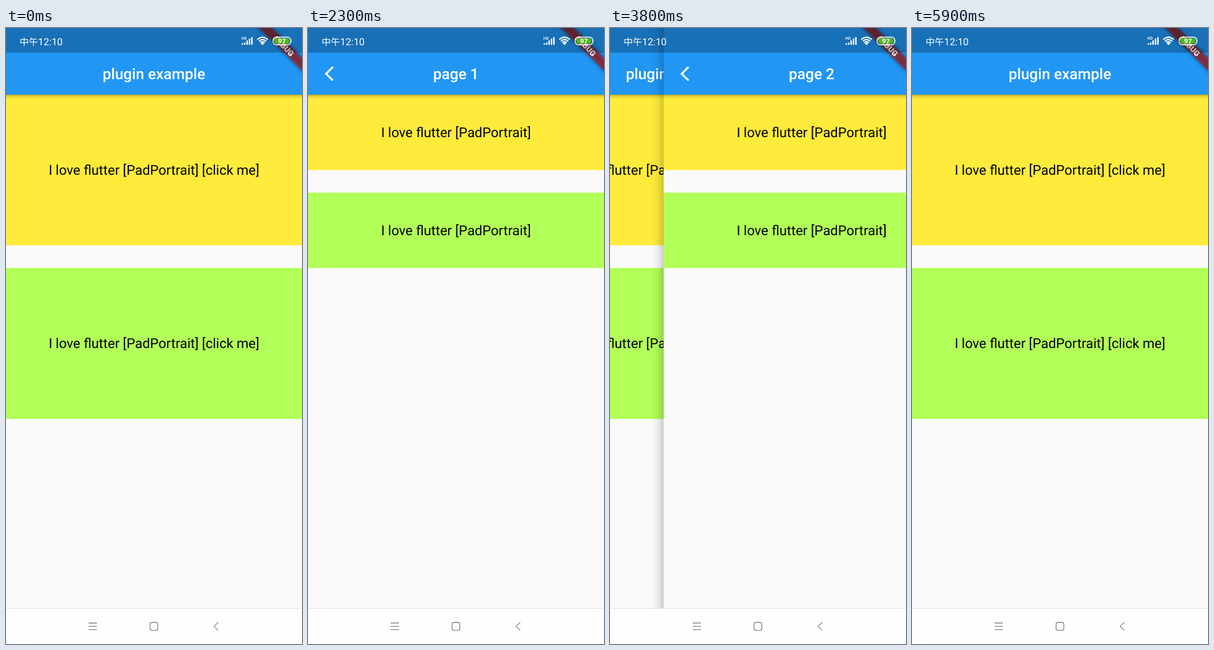
Write an HTML page that moves like this. It is 480x999 px and loops after 6 s.

```html
<!DOCTYPE html>
<html lang="en">
<head>
<meta charset="utf-8">
<title>plugin example</title>
<style>
  html, body { margin: 0; width: 100%; height: 100%; overflow: hidden; background: #fafafa; }
  svg { display: block; overflow: hidden; }
  text { font-family: Roboto, sans-serif; text-rendering: geometricPrecision; }
  .title { font-size: 24.44px; font-weight: 500; fill: #fff; text-anchor: middle; }
  .label { font-size: 22px; fill: #000; text-anchor: middle; }
  .cjk { font-family: "Noto Sans CJK SC", "Noto Sans CJK", sans-serif; font-size: 15px; }
  .line { fill: none; stroke-linecap: round; stroke-linejoin: round; }
</style>
</head>
<body>
<svg width="480" height="999" viewBox="0 0 480 999">
  <defs>
    <linearGradient id="drop" x2="0" y2="1">
      <stop offset="0" stop-opacity=".3"/>
      <stop offset=".35" stop-opacity=".13"/>
      <stop offset="1" stop-opacity="0"/>
    </linearGradient>
    <linearGradient id="edge">
      <stop offset="0" stop-opacity="0"/>
      <stop offset=".3" stop-opacity=".016"/>
      <stop offset=".6" stop-opacity=".07"/>
      <stop offset="1" stop-opacity=".22"/>
    </linearGradient>
    <filter id="soft" x="-20%" y="-100%" width="140%" height="300%">
      <feGaussianBlur stdDeviation="3"/>
    </filter>
  </defs>

  <g id="pages"></g>

  <!-- debug banner -->
  <g transform="translate(480 0) rotate(45)">
    <rect x="-60" y="34.2" width="120" height="14.7" fill-opacity=".5" filter="url(#soft)"/>
    <rect x="-60" y="34.2" width="120" height="14.7" fill="#b71c1c" fill-opacity=".627"/>
    <text y="46" font-size="12.5" font-weight="900" fill="#fff" text-anchor="middle">DEBUG</text>
  </g>

  <!-- status bar -->
  <rect width="480" height="40" fill-opacity=".25"/>
  <g fill="#fff">
    <text x="22" y="27.6" font-size="16"><tspan class="cjk">中午</tspan>12:10</text>
    <text x="381.5" y="18.6" font-size="6.6" font-weight="500">HD</text>
    <g id="bars"></g>
    <circle cx="416" cy="25.6" r="1.9"/>
    <path class="line" stroke="#fff" stroke-width="2"
      d="M408 18.2Q416 11.6 424 18.2M410.6 21Q416 16.6 421.4 21M413 23.6Q416 21.2 419 23.6"/>
    <rect x="433.2" y="14.8" width="28.6" height="12.4" rx="5" fill="none" stroke="#fff" stroke-width="1.4"/>
    <rect x="435.2" y="16.6" width="24.4" height="8.8" rx="3.4" fill="#4fb91c"/>
    <path d="M462.2 18.8q1.6 2.2 0 4.4z"/>
    <text x="447.5" y="25" font-size="11" font-weight="700" text-anchor="middle">97</text>
  </g>

  <!-- navigation bar -->
  <rect y="941" width="480" height="58" fill="#fefefe"/>
  <rect y="941" width="480" height="1" fill="#e2e2e2"/>
  <g class="line" stroke="#858585" stroke-width="1.3">
    <path d="M134.5 965H147M134.5 970.3H147M134.5 975.6H147"/>
    <rect x="233.6" y="964" width="12.6" height="12.8" rx="3"/>
    <path d="M343.8 964.2L337.4 970.4L343.8 976.6"/>
  </g>
</svg>

<script>
const LOOP = 6000, SLIDE = 300, WIDTH = 480;
const EASE = 'cubic-bezier(.35, .91, .33, .97)';
// when each sub page slides in and back out
const VISITS = [
  { title: 'page 1', open: 1950, close: 3012 },
  { title: 'page 2', open: 3690, close: 4675 },
];
const LABEL = 'I love flutter [PadPortrait]';

const add = (parent, tag, attrs, text = '') => {
  const el = document.createElementNS('http://www.w3.org/2000/svg', tag);
  for (const key in attrs) el.setAttribute(key, attrs[key]);
  el.textContent = text;
  return parent.appendChild(el);
};

function addPage(title, label, boxes) {
  const g = add(document.getElementById('pages'), 'g', {});
  add(g, 'rect', { width: WIDTH, height: 999, fill: '#fafafa' });
  for (const [y, height, fill] of boxes) {
    add(g, 'rect', { y, width: WIDTH, height, fill });
    add(g, 'text', { class: 'label', x: 240, y: y + height / 2 + 7.6 }, label);
  }
  add(g, 'rect', { y: 108, width: WIDTH, height: 7, fill: 'url(#drop)' });
  add(g, 'rect', { width: WIDTH, height: 108, fill: '#2196f3' });
  add(g, 'text', { class: 'title', x: 240, y: 82.7 }, title);
  return g;
}

// keyframes that go from rest to away at each visit and back again
function play(el, visits, rest, away) {
  const frames = [{ ...rest, offset: 0 }];
  const move = (start, from, to) => frames.push(
    { ...from, offset: start / LOOP, easing: EASE },
    { ...to, offset: (start + SLIDE) / LOOP });
  for (const { open, close } of visits) {
    move(open, rest, away);
    move(close, away, rest);
  }
  frames.push({ ...rest, offset: 1 });
  el.animate(frames, { duration: LOOP, iterations: Infinity });
}

const shift = x => ({ transform: `translateX(${x}px)` });

const home = addPage('plugin example', LABEL + ' [click me]',
  [[108, 244.4, '#ffeb3b'], [389, 245, '#b2ff59']]);
play(home, VISITS, shift(0), shift(-WIDTH / 3));

for (const visit of VISITS) {
  const page = addPage(visit.title, LABEL,
    [[108, 122.3, '#ffeb3b'], [267, 122.3, '#b2ff59']]);
  add(page, 'path', {
    d: 'M11.67 3.87L9.9 2.1 0 12l9.9 9.9 1.77-1.77L3.54 12z',
    transform: 'translate(27.2 59.5) scale(1.222)', fill: '#fff',
  });
  const edge = add(page, 'rect', { x: -24, width: 24, height: 941, fill: 'url(#edge)' });
  play(page, [visit], shift(WIDTH), shift(0));
  play(edge, [visit], { opacity: 0 }, { opacity: 1 });
}

[2.4, 3.6, 7, 10, 12.4].forEach((height, i) => add(document.getElementById('bars'), 'rect',
  { x: 382 + i * 3.9, y: 27.2 - height, width: 2.3, height }));
</script>
</body>
</html>
```
